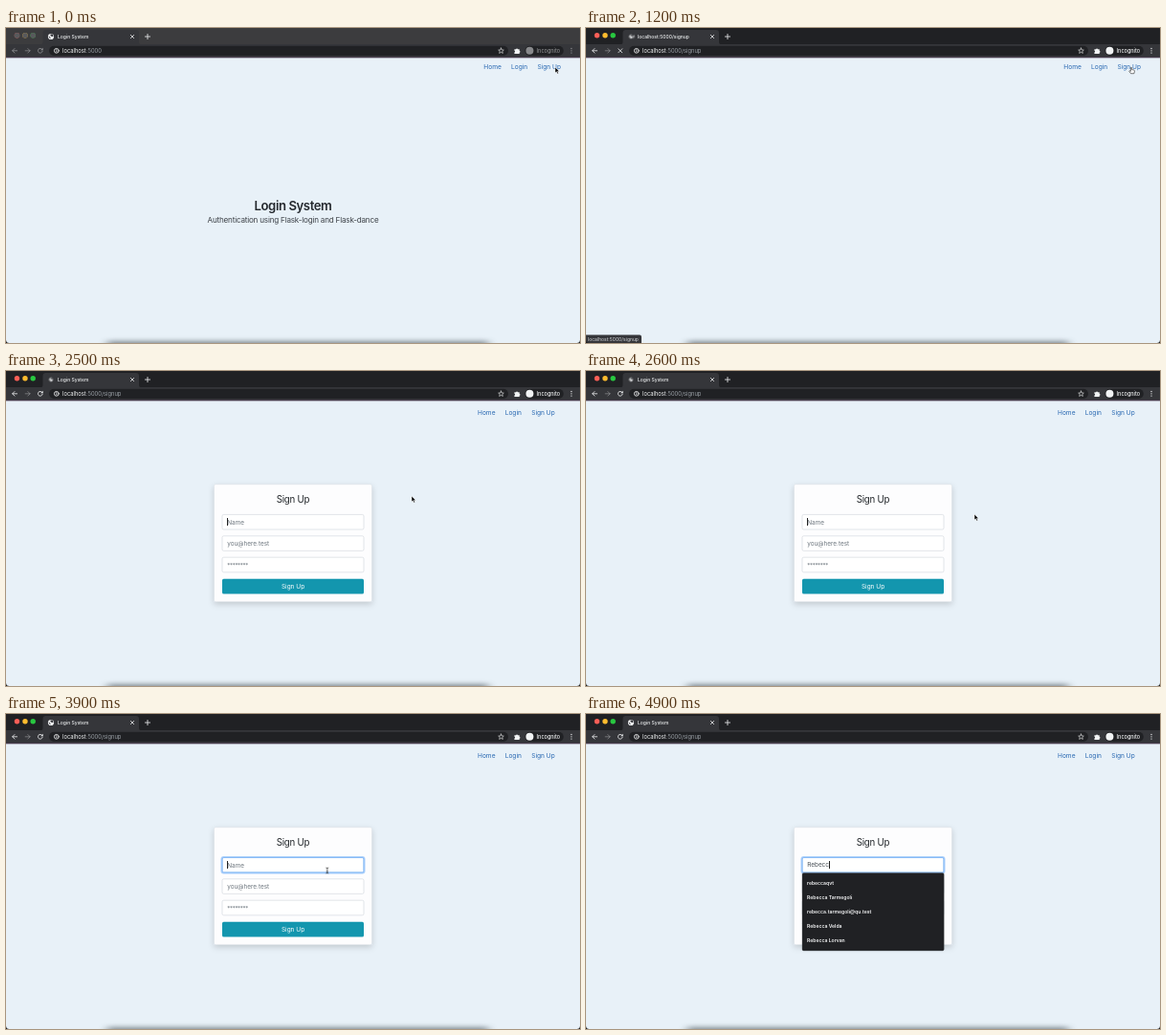
Recreate the animation shown at these times as an HTML page. Size 600 by 330 pixels, loop 5 s.

```html
<!DOCTYPE html>
<html lang="en">
<head>
<meta charset="utf-8">
<title>Login System</title>
<style>
html, body { margin: 0; width: 100%; height: 100%; overflow: hidden; background: #e8f1f8; }
svg { display: block; font-family: Inter, sans-serif; }
.t { animation: 5s step-end infinite; }
.line { fill: none; stroke: #f1f3f4; stroke-width: .8; stroke-linecap: round; stroke-linejoin: round; }
.title { font-size: 5px; font-weight: 500; fill: #eef0f1; }
.nav { font-size: 6.6px; fill: #2767b1; }
.field { fill: #fff; stroke: #ced4da; stroke-width: .6; }
.hint { font-size: 6.4px; fill: #6c757d; }
.list { font-size: 5.1px; font-weight: 600; fill: #f4f5f6; }
.typed { display: flex; align-items: center; height: 10px; line-height: 10px; color: #495057; }
.typed i { font-style: normal; font-size: 0; letter-spacing: -.1px; }
.typed b { width: .6px; height: 8px; background: #222; }
.spin { animation: spin 1s steps(10) infinite; transform-origin: 47px 9px; }
@keyframes spin { to { transform: rotate(360deg); } }

/* 1% of the loop is 50 ms */
@keyframes strip { 0% { fill: #3c3c3e; } 2%, 100% { fill: #202124; } }
@keyframes wake { 0% { opacity: .5; } 2%, 100% { opacity: 1; } }
@keyframes idle { 0% { opacity: 1; } 2%, 100% { opacity: 0; } }
@keyframes home { 0% { opacity: 1; } 22%, 100% { opacity: 0; } }
@keyframes path { 0% { opacity: 0; } 22%, 100% { opacity: 1; } }
@keyframes name { 0% { opacity: 1; } 22% { opacity: 0; } 28%, 100% { opacity: 1; } }
@keyframes address { 0% { opacity: 0; } 22% { opacity: 1; } 28%, 100% { opacity: 0; } }
@keyframes status { 0% { opacity: 0; } 18% { opacity: 1; } 28%, 100% { opacity: 0; } }
@keyframes reload { 0% { opacity: 1; } 20% { opacity: 0; } 50%, 100% { opacity: 1; } }
@keyframes stop { 0% { opacity: 0; } 20% { opacity: 1; } 50%, 100% { opacity: 0; } }
@keyframes globe { 0% { transform: none; } 22% { transform: scale(.62); } 54%, 100% { transform: none; } }
@keyframes wait { 0% { opacity: 0; } 22% { opacity: 1; } 28%, 100% { opacity: 0; } }
@keyframes load { 0% { opacity: 0; } 28% { opacity: 1; } 50%, 100% { opacity: 0; } }
@keyframes before { 0% { opacity: 1; } 50%, 100% { opacity: 0; } }
@keyframes after { 0% { opacity: 0; } 50%, 100% { opacity: 1; } }
@keyframes hover { 0% { opacity: 0; } 16% { opacity: 1; } 22% { opacity: 0; } 30% { opacity: 1; } 40%, 100% { opacity: 0; } }
@keyframes ring { 0% { opacity: 0; } 54% { opacity: .6; } 56%, 100% { opacity: 1; } }
@keyframes caret { 0% { opacity: 1; } 62% { opacity: 0; } 72%, 100% { opacity: 1; } }
@keyframes hint { 0% { opacity: 1; } 82%, 100% { opacity: 0; } }
@keyframes list { 0% { opacity: 0; } 82%, 100% { opacity: 1; } }
@keyframes sixth { 0% { opacity: 0; } 82% { opacity: 1; } 90%, 100% { opacity: 0; } }
@keyframes key1 { 0% { font-size: 0; } 82%, 100% { font-size: 6.5px; } }
@keyframes key2 { 0% { font-size: 0; } 86%, 100% { font-size: 6.5px; } }
@keyframes key3 { 0% { font-size: 0; } 90%, 100% { font-size: 6.5px; } }
@keyframes key4 { 0% { font-size: 0; } 92%, 100% { font-size: 6.5px; } }
@keyframes key5 { 0% { font-size: 0; } 94%, 100% { font-size: 6.5px; } }
@keyframes key6 { 0% { font-size: 0; } 98%, 100% { font-size: 6.5px; } }
@keyframes arrow { 0% { opacity: 1; } 16% { opacity: 0; } 40% { opacity: 1; } 66%, 100% { opacity: 0; } }
@keyframes hand { 0% { opacity: 0; } 16% { opacity: 1; } 40%, 100% { opacity: 0; } }
@keyframes beam { 0% { opacity: 0; } 66% { opacity: 1; } 82%, 100% { opacity: 0; } }
@keyframes move {
  0% { transform: translate(574px, 41px); }
  2% { transform: translate(573.5px, 40.5px); }
  6% { transform: translate(573px, 40px); }
  14% { transform: translate(572px, 40.5px); }
  16% { transform: translate(571px, 41px); }
  20% { transform: translate(570px, 41px); }
  32% { transform: translate(569px, 41px); }
  40% { transform: translate(564px, 45px); }
  42% { transform: translate(546px, 53px); }
  44% { transform: translate(520px, 66px); }
  46% { transform: translate(490px, 81px); }
  48% { transform: translate(456px, 96px); }
  50% { transform: translate(424px, 131px); }
  52% { transform: translate(406px, 150px); }
  62% { transform: translate(400px, 156px); }
  64% { transform: translate(385px, 165px); }
  66% { transform: translate(364px, 165px); }
  68% { transform: translate(348px, 165px); }
  70% { transform: translate(339px, 164.5px); }
  72%, 100% { transform: translate(335.7px, 164px); }
}
</style>
</head>
<body>
<svg width="600" height="330" viewBox="0 0 600 330">
  <defs>
    <filter id="soft" x="-10%" y="-200%" width="120%" height="500%"><feGaussianBlur stdDeviation="5 2.4"/></filter>
    <filter id="shade" x="-20%" y="-20%" width="140%" height="150%"><feDropShadow dx="0" dy="2.5" stdDeviation="3" flood-color="#000" flood-opacity=".16"/></filter>
  </defs>

  <!-- page -->
  <rect width="600" height="330" fill="#e8f1f8"/>
  <g class="t" style="animation-name:home" text-anchor="middle">
    <text x="300" y="191.2" font-size="13.1" font-weight="600" letter-spacing="-.4" fill="#24282d">Login System</text>
    <text x="300" y="203.6" font-size="8.1" letter-spacing="-.2" fill="#3c4147">Authentication using Flask-login and Flask-dance</text>
  </g>
  <g class="t" style="animation-name:before">
    <rect class="t" style="animation-name:hover" x="550" y="32" width="35.5" height="16.5" fill="#dbe8f6"/>
    <g class="nav">
      <text x="499.3" y="42.6">Home</text>
      <text x="528" y="42.6">Login</text>
      <text x="555.4" y="42.6">Sign Up</text>
    </g>
  </g>

  <!-- sign-up form -->
  <g class="t" style="animation-name:after">
    <g class="nav" fill="#1b62b0">
      <text x="493" y="45.9">Home</text>
      <text x="521.7" y="45.9">Login</text>
      <text x="549.2" y="45.9">Sign Up</text>
    </g>
    <rect x="217.5" y="118.7" width="165" height="123" rx="1.6" fill="#fdfdfe" stroke="#d5dbe0" stroke-width=".5" filter="url(#shade)"/>
    <text x="300" y="138.2" font-size="9.7" letter-spacing="-.2" text-anchor="middle" fill="#212529">Sign Up</text>
    <rect class="field" x="226" y="150.4" width="148" height="15.6" rx="1.6"/>
    <g class="t" style="animation-name:ring" fill="none">
      <rect x="225.5" y="149.9" width="149" height="16.6" rx="2" stroke="#acd0fb" stroke-width="2"/>
      <rect x="226" y="150.4" width="148" height="15.6" rx="1.6" stroke="#78b2f5" stroke-width=".7"/>
    </g>
    <rect class="field" x="226" y="172.8" width="148" height="15.6" rx="1.6"/>
    <rect class="field" x="226" y="195.2" width="148" height="15.6" rx="1.6"/>
    <text class="hint t" style="animation-name:hint" x="231.3" y="160.6">Name</text>
    <text class="hint" x="231.3" y="183">you@here.test</text>
    <text class="hint" x="231.3" y="206" style="font-size:6px" letter-spacing="-.3">********</text>
    <rect x="226" y="217.8" width="148" height="15.8" rx="1.6" fill="#1396ae"/>
    <text x="300" y="228.2" font-size="6.5" text-anchor="middle" fill="#fff">Sign Up</text>
    <foreignObject x="231.2" y="153" width="100" height="10">
      <div class="typed" xmlns="http://www.w3.org/1999/xhtml"><i class="t" style="animation-name:key1">R</i><i class="t" style="animation-name:key2">e</i><i class="t" style="animation-name:key3">b</i><i class="t" style="animation-name:key4">e</i><i class="t" style="animation-name:key5">c</i><i class="t" style="animation-name:key6">c</i><b class="t" style="animation-name:caret"></b></div>
    </foreignObject>
  </g>

  <!-- suggestions -->
  <g class="t list" style="animation-name:list">
    <rect x="226" y="166.4" width="148.2" height="81.6" rx="1.6" fill="#202124" stroke="#55585c" stroke-width=".4"/>
    <g class="t" style="animation-name:sixth">
      <rect x="226" y="166.4" width="148.2" height="96.8" rx="1.6" fill="#202124" stroke="#55585c" stroke-width=".4"/>
      <text x="231" y="254.3">regular guest</text>
    </g>
    <text x="231" y="179.3">rebeccaqvt</text>
    <text x="231" y="194.3">Rebecca Tarmegoli</text>
    <text x="231" y="209.3">rebecca.tarmegoli@qu.test</text>
    <text x="231" y="224.3">Rebecca Velda</text>
    <text x="231" y="239.3">Rebecca Lorvan</text>
  </g>

  <!-- link address -->
  <g class="t" style="animation-name:status">
    <path d="M0 321.6H56q2 0 2 2V330H0Z" fill="#35363a"/>
    <text x="2" y="328" font-size="5" fill="#d5d7da">localhost:5000/signup</text>
  </g>

  <!-- tab strip -->
  <rect class="t" style="animation-name:strip" width="600" height="18" fill="#202124"/>
  <path d="M35.5 17.5q3 0 3-3V5q0-3 3-3H136q3 0 3 3v9.5q0 3 3 3Z" fill="#35363a"/>
  <circle cx="11.5" cy="7.8" r="2.7" fill="#ff5f57"/>
  <circle cx="20" cy="7.8" r="2.7" fill="#febc2e"/>
  <circle cx="28.2" cy="7.8" r="2.7" fill="#28c840"/>
  <g class="t" style="animation-name:idle" fill="#58595c">
    <circle cx="11.5" cy="7.8" r="2.8"/><circle cx="20" cy="7.8" r="2.8"/><circle cx="28.2" cy="7.8" r="2.8"/>
  </g>
  <g class="t" style="animation-name:globe;transform-origin:47px 9px">
    <circle cx="47" cy="9" r="3.1" fill="#f1f3f4"/>
    <path d="M44.6 8.2l1.6 1.5.5 1.7q-2-.6-2.1-3.2ZM46.6 6.6h2.2l.8 2.2-1.6.2-1.6-1Z" fill="#35363a"/>
  </g>
  <g class="t" style="animation-name:wait"><path class="line spin" d="M47 5.8a3.2 3.2 0 0 1 2.2 .9"/></g>
  <g class="t" style="animation-name:load"><path class="line spin" d="M50.2 9a3.2 3.2 0 1 1-3.2-3.2"/></g>
  <text class="title t" style="animation-name:name" x="54" y="10.9">Login System</text>
  <text class="title t" style="animation-name:address" x="54" y="10.9">localhost:5000/signup</text>
  <path class="line" d="M130.4 7.4l3.2 3.2m0-3.2l-3.2 3.2M145.4 9h5.2M148 6.4v5.2"/>

  <!-- toolbar -->
  <rect y="17" width="600" height="13.8" fill="#35363a"/>
  <rect y="30.4" width="600" height=".9" fill="#38263c"/>
  <rect x="45" y="18.7" width="480" height="10.2" rx="5.1" fill="#202124"/>
  <g class="t" style="animation-name:wake">
    <path class="line" d="M11.6 23.8H6.8m2.2-2.3l-2.3 2.3 2.3 2.3"/>
    <g class="t" style="animation-name:reload">
      <path class="line" d="M37.8 22.4a2.4 2.4 0 1 0 .4 1.8"/>
      <path d="M38.7 20.8v2.5h-2.5Z" fill="#f1f3f4"/>
    </g>
  </g>
  <path class="line" opacity=".4" d="M20.2 23.8H25m-2.2-2.3l2.3 2.3-2.3 2.3"/>
  <path class="line t" style="animation-name:stop" d="M33.8 21.8l4 4m0-4l-4 4"/>
  <g class="line" stroke-width=".6">
    <circle cx="52.8" cy="23.8" r="2.4"/>
    <path d="M52.8 23.6v1.3M52.8 22.5v.1"/>
  </g>
  <text x="59" y="25.8" font-size="5.8" fill="#f1f3f4">localhost<tspan fill="#9aa0a6">:5000</tspan><tspan class="t" style="animation-name:path" fill="#9aa0a6">/signup</tspan></text>
  <path class="line" style="stroke-width:.6" d="M517.5 21l.8 1.9 2 .2-1.5 1.3.5 2-1.8-1-1.8 1 .5-2-1.5-1.3 2-.2Z"/>
  <path d="M531.4 22.2h1.6a1.1 1.1 0 0 1 2.1 0h1.6v1.5a1.1 1.1 0 0 1 0 2.1v1.2h-5.3v-1.4a1 1 0 0 0 0-1.9Z" fill="#f1f3f4"/>
  <rect x="542.4" y="18.7" width="40.4" height="10.2" rx="5.1" fill="#202124"/>
  <g class="t" style="animation-name:wake" fill="#f1f3f4">
    <circle cx="547.4" cy="23.8" r="4"/>
    <text x="554.6" y="25.8" font-size="5.5" font-weight="500">Incognito</text>
    <circle cx="591" cy="21.5" r=".65"/><circle cx="591" cy="23.8" r=".65"/><circle cx="591" cy="26.1" r=".65"/>
  </g>

  <!-- lower window edge -->
  <rect x="106" y="328" width="398" height="8" fill="#59636a" opacity=".7" filter="url(#soft)"/>
  <path d="M0 326.5q0 3.5 3.5 3.5H0ZM600 326.5q0 3.5-3.5 3.5H600Z" fill="#17181a"/>

  <!-- pointer -->
  <g class="t" style="animation-name:move">
    <path class="t" style="animation-name:arrow" d="M0 0V6l1.4-1.2 1 2.3 1.1-.5-1-2.2h1.8Z" fill="#000" stroke="#fff" stroke-width=".5"/>
    <path class="t" style="animation-name:hand" d="M-.6.5q.6-.8 1.2 0V2.6l2.2.5q.8.3.6 1.2L2.9 6.7H-.5L-2.2 4.4q0-.9.8-.6l.8.6Z" fill="#fff" stroke="#222" stroke-width=".6"/>
    <path class="t" style="animation-name:beam" d="M-1.3-3Q0-3 0-2Q0-3 1.3-3M0-2V2M-1.3 3Q0 3 0 2Q0 3 1.3 3M-.7 1H.7" fill="none" stroke="#222" stroke-width=".7"/>
  </g>
</svg>
</body>
</html>
```
